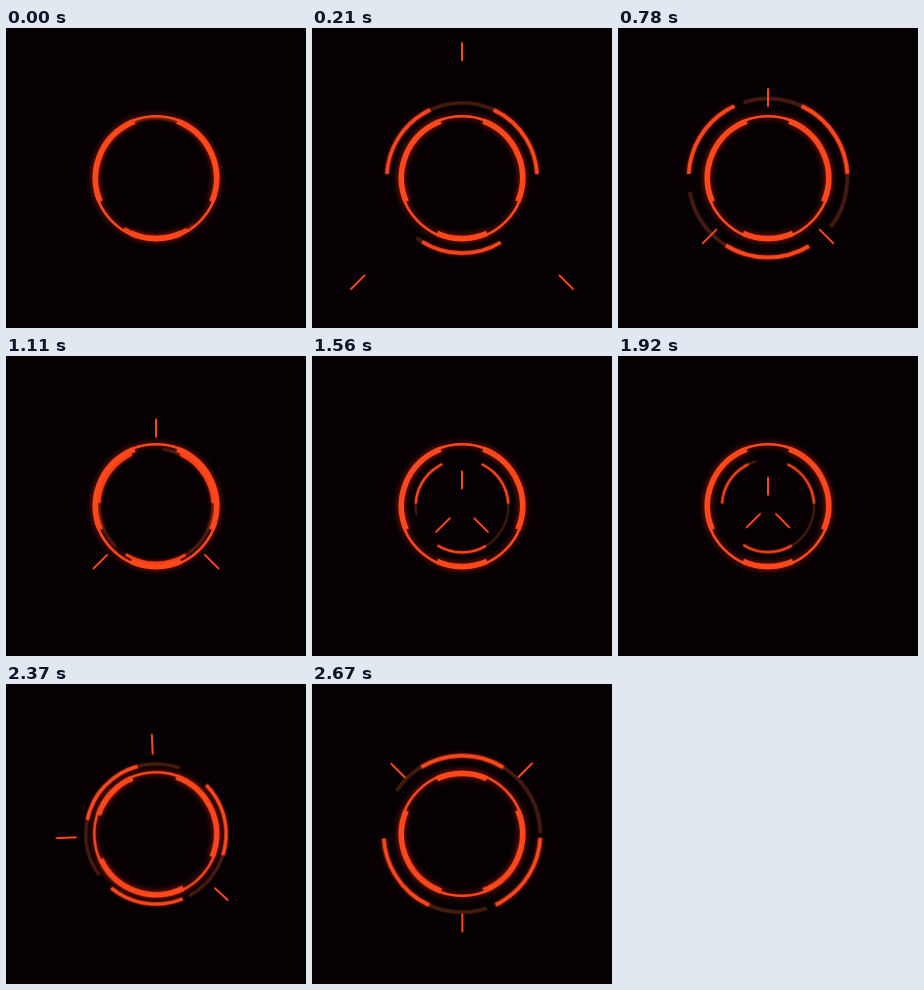
Animation, 300 px wide and 300 px high, one loop 2.7 s. Source, as an HTML page:

```html
<!DOCTYPE html>
<html lang="en">
<head>
<meta charset="utf-8">
<title>Ring loader</title>
<style>
  html, body { margin: 0; width: 100%; height: 100%; overflow: hidden; background: #060003; }
  svg { display: block; width: 100vw; height: 100vh; }
  circle, line { fill: none; stroke: #ff471c; }
  .turn, .arcs, .dim, .fly, .dist { animation: 2700ms linear infinite; }

  .ring { filter: drop-shadow(0 0 3px rgba(255, 45, 10, .65)); }
  .bright { filter: drop-shadow(0 0 2px rgba(255, 45, 10, .45)); }
  .dim { stroke: #421a0e; animation-name: spin; }
  .turn { animation-name: turn; }
  .arcs { animation-name: swell; }
  .fly { animation-name: fly; }
  .dist { animation-name: dist; }
  line { stroke-width: 2.1; stroke-linecap: round; }

  /* half turn of the whole figure at the end of the loop */
  @keyframes turn {
    0%, 80% { transform: rotate(0deg); animation-timing-function: cubic-bezier(.2, 0, .12, 1); }
    100% { transform: rotate(180deg); }
  }
  @keyframes spin {
    from { transform: rotate(-166.5deg); }
    to { transform: rotate(36deg); }
  }
  /* arcs grow out of the ring, shrink inside it, then grow again */
  @keyframes swell {
    0% { transform: scale(.745); animation-timing-function: cubic-bezier(.25, .5, .3, 1); }
    20%, 25.93% { transform: scale(1); animation-timing-function: cubic-bezier(.4, 0, .15, 1); }
    62.96% { transform: scale(.575); }
    70.37% { transform: scale(.575); animation-timing-function: cubic-bezier(.3, 0, .5, 1); }
    100% { transform: scale(.98); }
  }
  /* ticks arrive from off stage */
  @keyframes fly {
    0% { transform: translateX(calc(var(--k) * 122px)); animation-timing-function: cubic-bezier(.165, .84, .44, 1); }
    40.74%, 100% { transform: translateX(0px); }
  }
  /* distance of the ticks from the centre */
  @keyframes dist {
    0%, 40% { transform: translateX(69px); animation-timing-function: cubic-bezier(.4, 0, .15, 1); }
    70.37% { transform: translateX(10px); animation-timing-function: cubic-bezier(.25, 0, .05, 1); }
    89.63%, 100% { transform: translateX(80px); }
  }
</style>
</head>
<body>
<svg viewBox="0 0 300 300">
  <g transform="translate(150 150)">
    <g class="turn">
      <g class="arcs" stroke-width="4">
        <circle class="dim" r="80" pathLength="360" stroke-dasharray="146 72 60 82"/>
        <g class="bright">
          <circle r="80" pathLength="360" stroke-dasharray="63 61 62 50 62 62" transform="rotate(59)"/>
        </g>
      </g>
      <g class="ring">
        <circle r="61.7" stroke-width="2.6"/>
        <circle r="60.6" stroke-width="5.6" pathLength="360" stroke-dasharray="48.8 42.6 92.5 41 92.5 42.6" transform="rotate(65.6)"/>
      </g>
      <g transform="rotate(-90)" style="--k:1">
        <g class="fly"><g class="dist"><line x1="0.5" x2="17.5"/></g></g>
      </g>
      <g transform="rotate(45)" style="--k:1.414">
        <g class="fly"><g class="dist"><line x1="0.5" x2="19.5"/></g></g>
      </g>
      <g transform="rotate(135)" style="--k:1.414">
        <g class="fly"><g class="dist"><line x1="0.5" x2="19.5"/></g></g>
      </g>
    </g>
  </g>
</svg>
</body>
</html>
```
